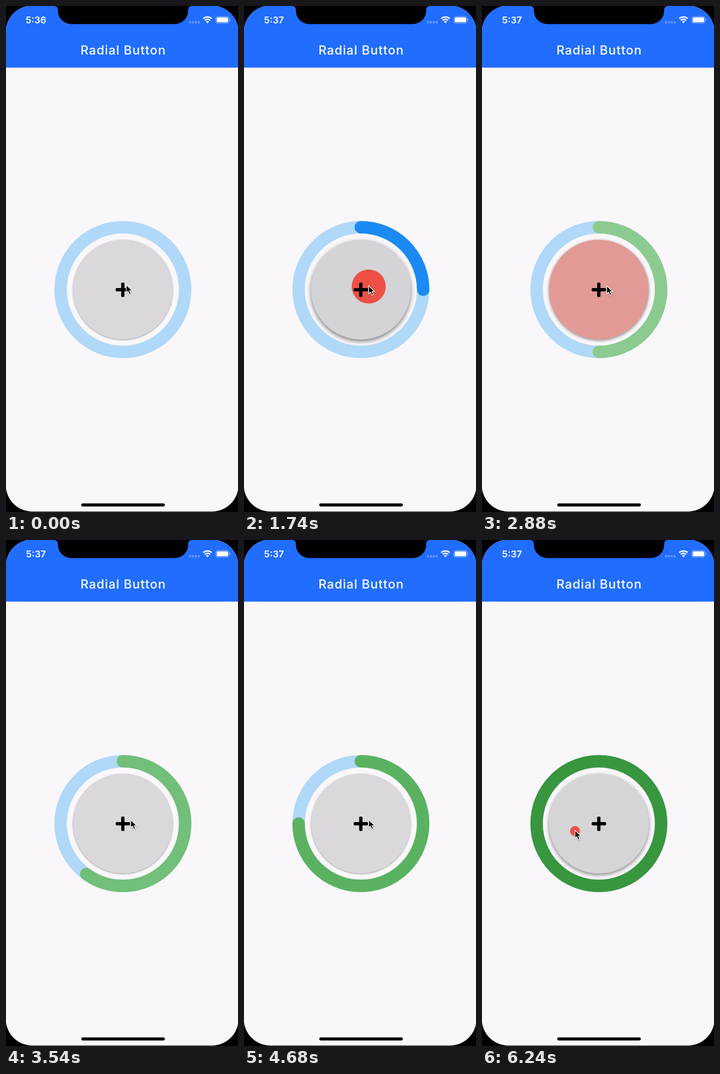
Animation of 507 by 1105 pixels, one loop 6300 ms. Source, as an HTML page:

```html
<!DOCTYPE html>
<html lang="en">
<head>
<meta charset="utf-8">
<title>Radial Button</title>
<style>
  html, body { margin: 0; height: 100%; overflow: hidden; background: #000; }
  svg { display: block; width: 100%; height: 100%; }
  text { font-family: Inter, Roboto, sans-serif; fill: #fff; text-anchor: middle; }
  #cursor { filter: drop-shadow(0 1px 1px rgba(0, 0, 0, .35)); }
</style>
</head>
<body>
<svg viewBox="0 0 507 1105">
  <defs>
    <clipPath id="screen"><rect x="-.5" y="-1" width="508.5" height="1105" rx="58"/></clipPath>
    <clipPath id="disc"><circle cx="255.4" cy="619.4" r="109"/></clipPath>
  </defs>
  <rect width="507" height="1105"/>
  <g clip-path="url(#screen)">
    <rect width="508" height="1105" fill="#f9f7fa"/>
    <rect width="508" height="134.6" fill="#216dff"/>
  </g>
  <path d="M106 0Q113.5 1 113.5 9V11A30 28.5 0 0 0 143.5 39.5H368A30 28.5 0 0 0 398 11V9Q398 1 405.5 0Z"/>

  <text id="clock" x="65.5" y="37.5" font-size="20.3" font-weight="600"></text>
  <text x="256.2" y="106" font-size="27" font-weight="500" letter-spacing="1.3">Radial Button</text>

  <g fill="#fff">
    <g opacity=".3">
      <rect x="400" y="33" width="4.4" height="5" rx="1.3"/>
      <rect x="406.3" y="33" width="4.4" height="5" rx="1.3"/>
      <rect x="412.6" y="33" width="4.4" height="5" rx="1.3"/>
      <rect x="418.9" y="33" width="4.4" height="5" rx="1.3"/>
    </g>
    <path d="M440.3 37.8l-3.4-3.7a5 5 0 0 1 6.8 0z"/>
    <path d="M434.4 31.3a8.8 8.8 0 0 1 11.8 0M431 27.5a13.8 13.8 0 0 1 18.6 0" fill="none" stroke="#fff" stroke-width="3"/>
    <rect x="458.5" y="22.8" width="28.8" height="14.8" rx="4.5" fill="none" stroke="#fff" stroke-width="1.3" opacity=".45"/>
    <rect x="460.5" y="24.8" width="24.8" height="10.8" rx="2.6"/>
    <path d="M488.6 27.8q2 .7 2 2.4t-2 2.4z" opacity=".5"/>
  </g>

  <g fill="none" stroke-width="27.2" transform="rotate(-90 255.4 619.3)">
    <circle cx="255.4" cy="619.3" r="136.1" stroke="#b0d8f9"/>
    <circle id="arc" cx="255.4" cy="619.3" r="136.1" pathLength="100" stroke-linecap="round"/>
  </g>
  <circle id="button" cx="255.4" cy="619.4" r="109"/>
  <g id="splashes" clip-path="url(#disc)" fill="#ee5046"></g>
  <rect x="239.6" y="616" width="31.5" height="7.2" rx="2.4"/>
  <rect x="251.7" y="603.9" width="7.2" height="31.5" rx="2.4"/>
  <rect x="164.5" y="1086.2" width="182.5" height="6.7" rx="3.3"/>
  <path id="cursor" d="M0 0V17.6L4 13.8 7 20.6 10.3 19.2 7.4 12.6H12.8Z" stroke="#fff" stroke-width="1.4"/>
</svg>
<script>
const LOOP = 6300, HOLD = 170, FADE = 120;
// Moments when each tap is let go; every tap adds 5 %
const releases = [610, 845, 1080, 1318, 1550, 1780, 2012, 2245, 2530, 2815, 3105,
  3400, 3760, 4150, 4530, 4860, 5090, 5315, 5545, 5775, 6373];
const greens = ['#8bcb90', '#72bf79', '#5ab260', '#4aa653', '#38963f'];

const $ = id => document.getElementById(id);
const clamp = x => Math.min(1, Math.max(0, x));
const ease = x => x * x * (3 - 2 * x);
const set = (el, attrs) => { for (const k in attrs) el.setAttribute(k, attrs[k]); };

function pointer(t) {
  const a = ease(clamp((t - 60) / 300)), b = ease(clamp((t - 5880) / 280));
  return [262.7 + 9.8 * a - 69.2 * b, 609 + 2 * a + 23 * b];
}

const splashes = releases.map(up => {
  const el = document.createElementNS('http://www.w3.org/2000/svg', 'circle');
  const [cx, cy] = pointer(up - HOLD);
  set(el, { cx, cy: cy + 1.6 });
  return $('splashes').appendChild(el);
});

function draw(t) {
  let press = 0;
  releases.forEach((up, i) => {
    const held = t - up + HOLD, after = Math.max(0, t - up);
    const live = held > 0 && after < FADE, fade = clamp(1 - after / FADE);
    // Slow growth while held, fast growth and fade once released
    set(splashes[i], {
      r: live ? .284 * Math.min(held, HOLD) + 2.26 * after : 0,
      opacity: fade
    });
    press = Math.max(press, Math.min(clamp(held / 50), fade));
  });

  const percent = Math.min(100, 5 * releases.filter(up => up <= t).length);
  const shade = Math.min(4, Math.floor(percent / 10) - 5);
  set($('arc'), {
    stroke: percent ? (shade < 0 ? '#1b8af2' : greens[shade]) : 'none',
    'stroke-dasharray': percent + ' 100'
  });

  const dim = 6 * press;
  set($('button'), { fill: `rgb(${218 - dim},${216 - dim * .8},${218 - dim * .9})` });
  $('button').style.filter =
    `drop-shadow(0 ${1.6 + 3 * press}px ${1.8 + 2.9 * press}px rgba(0,0,0,${.42 + .08 * press}))`;

  set($('cursor'), { transform: `translate(${pointer(t)})` });
  $('clock').textContent = t < 300 ? '5:36' : '5:37';
}

const start = performance.now();
function frame() {
  draw((performance.now() - start) % LOOP);
  requestAnimationFrame(frame);
}
frame();
</script>
</body>
</html>
```
